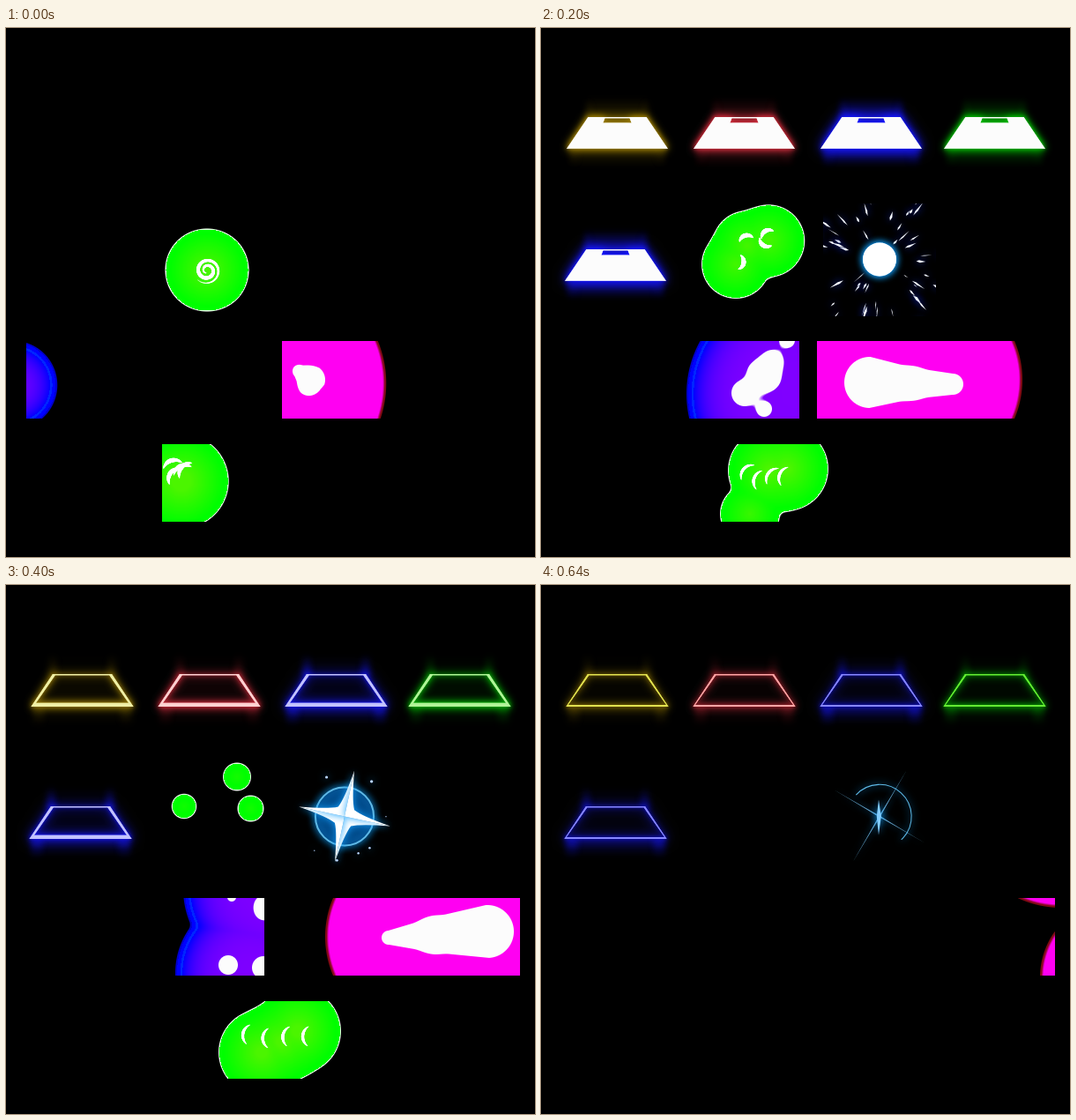
Write an HTML page with a canvas that moves like this. It is 600x600 px and loops after 680 ms.

```html
<!DOCTYPE html>
<html>
<head>
<meta charset="utf-8">
<style>
html, body { margin: 0; width: 100%; height: 100%; overflow: hidden; background: #000; }
canvas { display: block; width: 600px; height: 600px; }
</style>
</head>
<body>
<canvas id="stage" width="600" height="600"></canvas>
<script>
const ctx = document.getElementById('stage').getContext('2d');
const LOOP = 680, STEP = 40, TAU = Math.PI * 2;

const lerp = (a, b, k) => a + (b - a) * k;
const clamp = (v, lo = 0, hi = 1) => Math.max(lo, Math.min(hi, v));
const span = (a, b, t) => clamp((t - a) / (b - a));
const blend = (a, b, k) => a.map((v, i) => lerp(v, b[i], k));
const rgba = (c, a = 1) => `rgba(${c.map(Math.round).join(',')},${a})`;
const noise = seed => () => (seed = seed * 16807 % 2147483647) / 2147483647;

function dot(x, y, r, color) {
  ctx.fillStyle = color;
  ctx.beginPath();
  ctx.arc(x, y, r, 0, TAU);
  ctx.fill();
}
function poly(pts) {
  ctx.beginPath();
  pts.forEach(p => ctx.lineTo(...p));
  ctx.fill();
}
function turned(angle, draw) {
  ctx.save();
  ctx.rotate(angle);
  draw();
  ctx.restore();
}

// ---- merging balls ----
const ball = (x, y, r) => ({ x, y, r });
const pose = (t, ...balls) => ({ t, balls });

function ballsAt(poses, t) {
  const i = poses.findIndex(p => p.t >= t);
  if (i < 0 || t < poses[0].t) return [];
  const b = poses[i], a = poses[Math.max(0, i - 1)], k = a === b ? 0 : (t - a.t) / (b.t - a.t);
  return a.balls.map((p, n) => ball(...['x', 'y', 'r'].map(m => lerp(p[m], b.balls[n][m], k)))).filter(p => p.r > 0);
}
const gap = (x, y, b) => Math.hypot(x - b.x, y - b.y) - b.r;

// Signed depth inside a smooth union.
function merge(balls, soft) {
  return (x, y) => -balls.reduce((d, b) => {
    const e = gap(x, y, b), h = Math.max(soft - Math.abs(d - e), 0) / soft;
    return Math.min(d, e) - h * h * soft / 4;
  }, 1e4);
}
// Signed depth inside a tapered tube through the balls.
function tube(balls) {
  return (x, y) => {
    let d = 1e4;
    for (let i = 1; i < balls.length; i++) {
      const a = balls[i - 1], b = balls[i], dx = b.x - a.x, dy = b.y - a.y;
      const k = clamp(((x - a.x) * dx + (y - a.y) * dy) / (dx * dx + dy * dy));
      const e = gap(x, y, ball(a.x + dx * k, a.y + dy * k, lerp(a.r, b.r, k)));
      const h = Math.max(8 - Math.abs(d - e), 0) / 8;
      d = Math.min(d, e) - h * h * 2;
    }
    return -d;
  };
}

const layer = document.createElement('canvas'), lctx = layer.getContext('2d');
function paint([x0, y0, w, h], depth, shade) {
  layer.width = w;
  layer.height = h;
  const img = lctx.createImageData(w, h);
  for (let y = 0, i = 0; y < h; y++) for (let x = 0; x < w; x++, i += 4) {
    const d = depth(x0 + x + 0.5, y0 + y + 0.5);
    if (d > -0.5) img.data.set([...shade(d), 255 * clamp(d + 0.5)], i);
  }
  lctx.putImageData(img, 0, 0);
  ctx.drawImage(layer, x0, y0);
}

const white = () => [252, 252, 252];
const green = d => d < 1.1 ? [225, 255, 225] : [clamp((d - 6) * 2, 0, 75), 255 - clamp(d / 4, 0, 10), 0];
const violet = d => [128 * (1 - Math.exp(-Math.max(0, d - 8) / 18)), Math.abs(d - 7) < 1.3 ? 38 : 0, d < 2 ? 205 : 255];
const pink = d => blend([130, 10, 20], [255, 0, 242], span(1.5, 4, d));

// ---- slime ----
const slimeA = {
  box: [176, 199, 128, 128],
  poses: [
    pose(0, ball(224, 271, 42), ball(224, 278, 42), ball(232, 271, 42), ball(232, 278, 42)),
    pose(120, ball(213, 277, 42), ball(212, 288, 40), ball(232, 270, 47), ball(236, 294, 38)),
    pose(200, ball(234, 247, 40), ball(221, 268, 39), ball(257, 242, 40), ball(259, 241, 39)),
    pose(280, ball(207, 236, 30), ball(212, 282, 31), ball(274, 232, 38), ball(282, 239, 41)),
    pose(400, ball(202, 251, 12.5), ball(202, 251, 12.5), ball(262, 217.5, 16), ball(277.5, 253.5, 15)),
    pose(480, ball(202, 251, 0), ball(202, 251, 0), ball(262, 217, 0), ball(277, 253, 0))
  ]
};
const slimeB = {
  box: [177, 472, 270, 88],
  poses: [
    pose(0, ball(199, 514, 51), ball(199, 514, 51), ball(199, 514, 51)),
    pose(120, ball(239, 496, 54), ball(240, 519, 48), ball(240, 540, 37)),
    pose(200, ball(278, 500, 48), ball(260, 502, 48), ball(237, 551, 34)),
    pose(280, ball(313, 497, 51), ball(272, 495, 32), ball(275, 560, 45)),
    pose(400, ball(331, 506, 49), ball(312, 518, 48), ball(290, 530, 49)),
    pose(480, ball(384, 527, 49), ball(352, 545, 50), ball(324, 531, 53)),
    pose(640, ball(420, 550, 0), ball(390, 560, 0), ball(360, 555, 0))
  ]
};
// An arc that swells in the middle and tapers to both ends.
function swell(x, y, r0, r1, from, turn, w) {
  const n = 30 + Math.round(turn * 20);
  for (let i = 0; i <= n; i++) {
    const u = i / n, a = from + turn * u, r = lerp(r0, r1, u);
    dot(x + r * Math.cos(a), y + r * Math.sin(a), 0.4 + w / 2 * Math.sin(Math.PI * u), '#fff');
  }
}
function drawSlime({ box, poses }, t) {
  const balls = ballsAt(poses, t);
  if (balls.length) paint(box, merge(balls, 7), green);
  return balls;
}
function drawSlimeA(t) {
  const balls = drawSlime(slimeA, t);
  if (t < 160) {
    const u = t / 120;
    swell(lerp(228, 226, u), lerp(275, 279, u), 3, lerp(15, 25, u), 1.9 - u, lerp(13, 9, u), 3.2);
  } else if (t < 320) {
    const size = lerp(9, 3, span(200, 280, t));
    balls.forEach((b, i) => swell(b.x, b.y - 3, size, size, t / 60 + i * 2, 2.2, 4));
  }
}
function drawSlimeB(t) {
  const balls = drawSlime(slimeB, t);
  if (!balls.length || t > 480) return;
  const mean = m => balls.reduce((s, b) => s + b[m], 0) / balls.length;
  const gapX = 6 + t / 24, rnd = noise(91);
  for (let i = 0; i < 4; i++) {
    const sway = 12 * (rnd() - 0.5) * (1 - t / 600);
    swell(mean('x') + (i - 1.3) * gapX, mean('y') - 5 + sway, 13, 13, 2 + (rnd() - 0.5) * 3 * (1 - t / 520), 2, t ? 2.4 : 4);
  }
}

// ---- streams ----
const streamV = {
  box: [23, 355, 270, 88], shade: violet, fill: b => merge(b, 12),
  body: [
    pose(0, ball(8, 405, 49), ball(8, 405, 49)),
    pose(120, ball(118, 399, 91), ball(136, 399, 91)),
    pose(200, ball(289, 415, 124), ball(300, 415, 124)),
    pose(280, ball(232, 360, 60), ball(300, 470, 104)),
    pose(400, ball(300, 345, 99), ball(280, 440, 88)),
    pose(480, ball(330, 330, 86), ball(295, 475, 75)),
    pose(560, ball(390, 300, 60), ball(380, 520, 60))
  ],
  foam: [
    pose(120, ball(80, 401, 5), ball(104, 396, 13), ball(127, 394, 16), ball(150, 391, 24), ball(157, 390, 20)),
    pose(200, ball(253, 432, 9), ball(231, 414, 15), ball(253, 394, 20), ball(263, 377, 12), ball(279, 354, 9)),
    pose(280, ball(255, 425, 9), ball(268, 422, 21), ball(234, 366, 11), ball(275, 372, 14), ball(279, 360, 16)),
    pose(400, ball(252, 431, 11), ball(292, 434, 13), ball(256, 354, 5), ball(293, 370, 10), ball(293, 362, 10)),
    pose(480, ball(270, 420, 0), ball(300, 434, 0), ball(270, 350, 0), ball(300, 370, 0), ball(300, 360, 0))
  ]
};
const streamP = {
  box: [313, 355, 270, 88], shade: pink, fill: tube,
  body: [
    pose(0, ball(305, 403, 125), ball(305, 403, 125)),
    pose(120, ball(310, 408, 120), ball(324, 408, 120)),
    pose(200, ball(330, 399, 140), ball(434, 399, 112)),
    pose(280, ball(360, 399, 145), ball(545, 399, 140)),
    pose(400, ball(474, 399, 112), ball(600, 399, 150)),
    pose(480, ball(620, 372, 136), ball(640, 450, 150)),
    pose(640, ball(590, 250, 116), ball(655, 445, 89))
  ],
  foam: [
    pose(0, ball(332, 389, 7), ball(345, 399, 15), ball(343, 405, 11)),
    pose(120, ball(331, 364, 11), ball(345, 397, 15), ball(353, 424, 19)),
    pose(200, ball(373, 402, 29), ball(420, 403, 18), ball(467, 404, 12)),
    pose(280, ball(373, 402, 29), ball(470, 401, 17), ball(556, 407, 8)),
    pose(400, ball(434, 400, 8), ball(485, 397, 20), ball(546, 393, 30)),
    pose(480, ball(557, 404, 7), ball(563, 412, 8), ball(571, 421, 6)),
    pose(560, ball(617, 404, 5), ball(623, 412, 5), ball(630, 420, 5))
  ]
};
function drawStream({ box, shade, fill, body, foam }, t) {
  const b = ballsAt(body, t), f = ballsAt(foam, t);
  if (b.length) paint(box, merge(b, 5), shade);
  if (f.length) paint(box, fill(f), white);
}

// ---- pads ----
const BLUE = [20, 20, 255];
const pads = [
  { x: 86.5, dy: 0, c: [150, 120, 0], line: [225, 225, 80], power: 0.5 },
  { x: 230.5, dy: 0, c: [200, 40, 55], line: [255, 165, 165], power: 0.5 },
  { x: 374.5, dy: 0, c: BLUE, line: [135, 135, 255], power: 1 },
  { x: 514.5, dy: 0, c: [0, 180, 0], line: [100, 235, 50], power: 0.55 },
  { x: 84.5, dy: 150, c: BLUE, line: [135, 135, 255], power: 1 }
];
function beam(x, half, y, rise, c, a) {
  const g = ctx.createLinearGradient(0, y, 0, y + rise);
  g.addColorStop(0, rgba(c, a));
  g.addColorStop(0.45, rgba(c, a * 0.4));
  g.addColorStop(1, rgba(c, 0));
  ctx.fillStyle = g;
  ctx.fillRect(x - half, Math.min(y, y + rise), half * 2, Math.abs(rise));
}
function drawPad({ x, dy, c, line, power }, t) {
  if (t < 80) return;
  const grow = 1 - (1 - span(56, 231, t)) ** 2, rest = 0.37 ** ((t - 200) / 80);
  const top = 20 + 13.5 * grow, foot = 34.7 + 23.3 * grow, low = 101 + 37 * grow;
  const hollow = t >= 200, open = span(160, 320, t), fade = span(320, 480, t);
  const quad = (a, b, y0, y1) => {
    ctx.moveTo(x - a, y0);
    ctx.lineTo(x + a, y0);
    ctx.lineTo(x + b, y1);
    ctx.lineTo(x - b, y1);
    ctx.closePath();
  };
  const hole = () => quad(32.2 - 18.2 * rest, 55.8 - 39.8 * rest, 102.3, 136.2 - 28.7 * rest);
  ctx.save();
  ctx.translate(0, dy);
  ctx.filter = 'blur(3px)';
  beam(x, top + 2, 104, -25, c, power * lerp(1, 0.12, open));
  beam(x, foot - 3, low, 20, c, power * lerp(0.85, 0.3, open));
  for (const s of [-1, 1]) {
    beam(x + s * top, 5, 104, -25, c, power * open * lerp(0.8, 0.5, fade));
    beam(x + s * (foot - 8), 7, low, 22, c, power * open * 0.5);
  }
  ctx.filter = 'none';
  if (hollow) {
    ctx.fillStyle = rgba(blend([0, 0, 0], c, 0.04 + 0.4 * Math.min(1, rest)));
    ctx.beginPath();
    hole();
    ctx.fill();
  }
  ctx.beginPath();
  quad(top, foot, 101, low);
  if (hollow) hole();
  ctx.fillStyle = rgba(blend([252, 252, 252], line, fade));
  ctx.shadowColor = rgba(c);
  for (const blur of [16 * power, 10, 4]) {
    ctx.shadowBlur = blur;
    ctx.fill('evenodd');
  }
  ctx.restore();
}

// ---- spark ----
function drawRays(size) {
  for (let i = 0; i < 8; i++) {
    const a = i * TAU / 8, long = i % 2, n = (long ? 76 : 54) * size, w = long ? 8 + 5 * Math.sin(a) : 3;
    turned(a - (a > Math.PI ? 0.12 : 0), () => poly([[8, -2], [n * 0.45, -w * 0.35], [n * 0.75, -w * 0.65], [n * 0.96, -w * 0.55],
      [n * 0.84, -w * 0.15], [n, 0], [n * 0.8, w * 0.2], [n * 0.9, w * 0.6], [n * 0.6, w * 0.45], [8, 2]]));
  }
  const burst = (n, inner, outer) => poly(Array.from({ length: n * 2 }, (_, i) => {
    const r = (i % 2 ? inner : outer + i % 3 * inner * 0.4) * size, a = i * Math.PI / n - Math.PI / 2;
    return [r * Math.cos(a), r * Math.sin(a)];
  }));
  burst(11, 13, 19);
  ctx.shadowBlur = 0;
  ctx.fillStyle = '#0a1878';
  burst(5, 3, 6);
  dot(0, 0, 2, '#cfe0ff');
}
function drawShards(count, far, size) {
  const rnd = noise(1234);
  for (let i = 0; i < count; i++) {
    const a = (i % 4 + 0.5) * TAU / 4 + (rnd() - 0.5) * 1.5, r = lerp(22, far, rnd());
    const n = size * (0.4 + rnd()), w = 0.4 + rnd() * 1.1;
    turned(a, () => poly([[r, 0], [r + n * 0.3, -w], [r + n, 0], [r + n * 0.4, w]]));
  }
}
function drawStar(r, w, angle) {
  const d = w * 0.72, c = w * 1.5, e = w * 0.33;
  for (let i = 0; i < 4; i++) turned(angle + i * TAU / 4, () => {
    ctx.beginPath();
    ctx.moveTo(0, 0);
    ctx.lineTo(r, 0);
    ctx.quadraticCurveTo(c, e, d, d);
    ctx.quadraticCurveTo(e, c, 0, r);
    ctx.fill();
  });
}
function drawSpark(t) {
  if (t < 80) return;
  ctx.save();
  ctx.beginPath();
  ctx.rect(320, 199, 128, 128);
  ctx.clip();
  ctx.translate(384, 262.5);
  ctx.fillStyle = '#f8fbff';
  ctx.shadowColor = '#1838ff';
  ctx.shadowBlur = 8;
  if (t <= 120) drawRays(t / 120);
  else drawFlare(t);
  ctx.restore();
}
function drawFlare(t) {
  const late = span(400, 640, t), calm = span(280, 400, t);
  if (t <= 320) drawShards(t <= 240 ? 60 : 16, t <= 240 ? 84 : 56, t <= 240 ? 13 : 6);
  const r = 37 - 18 * Math.exp(-(t - 200) / 110), thick = 1 + 18 * Math.exp(-(t - 200) / 70);
  ctx.shadowColor = '#10a0ff';
  if (t < 200) return dot(0, 0, 19, '#fff');
  if (t >= 280 && t < 560) dot(0, 0, r, rgba([0, 60, 125], 0.65 - late));
  ctx.lineWidth = Math.min(thick, r);
  ctx.strokeStyle = rgba(blend([255, 255, 255], [95, 185, 230], calm));
  ctx.beginPath();
  const cut = span(480, 640, t);
  ctx.arc(0, 0, r - ctx.lineWidth / 2, lerp(-Math.PI, -2.4, cut), lerp(Math.PI, 0.82, cut));
  ctx.stroke();
  if (t <= 200) return dot(0, 0, 19, '#fff');

  ctx.fillStyle = rgba(blend([255, 255, 255], [130, 205, 255], cut));
  const angle = lerp(0.04, 0.21, calm) + 0.32 * Math.sqrt(late) * lerp(0.85, 1, late);
  if (t <= 320) drawStar(54, 1.6, 0.2);
  drawStar(lerp(24, 53, calm) + 7 * late, lerp(lerp(8, 13, calm), 1.3, late), angle);
  if (t >= 560) poly([[-1, -19], [1.8, 0], [-1, 21], [-3.2, 0]]);
  if (t >= 320 && t < 600) {
    const rnd = noise(57);
    for (let i = 0; i < 7; i++) {
      const a = rnd() * TAU, q = 42 + 10 * rnd();
      dot(q * Math.cos(a), q * Math.sin(a), (0.6 + 1.4 * rnd()) * (1 - late * 0.8), '#b8d4ff');
    }
  }
}

function draw(t) {
  ctx.fillStyle = '#000';
  ctx.fillRect(0, 0, 600, 600);
  pads.forEach(p => drawPad(p, t));
  drawSlimeA(t);
  drawSpark(t);
  drawStream(streamV, t);
  drawStream(streamP, t);
  drawSlimeB(t);
}

const begin = performance.now();
let shown = -1;
function tick() {
  const now = (performance.now() - begin) % LOOP;
  const t = now < 2 * STEP ? 0 : Math.floor(now / STEP) * STEP;
  if (t !== shown) draw(shown = t);
  requestAnimationFrame(tick);
}
tick();
</script>
</body>
</html>
```
